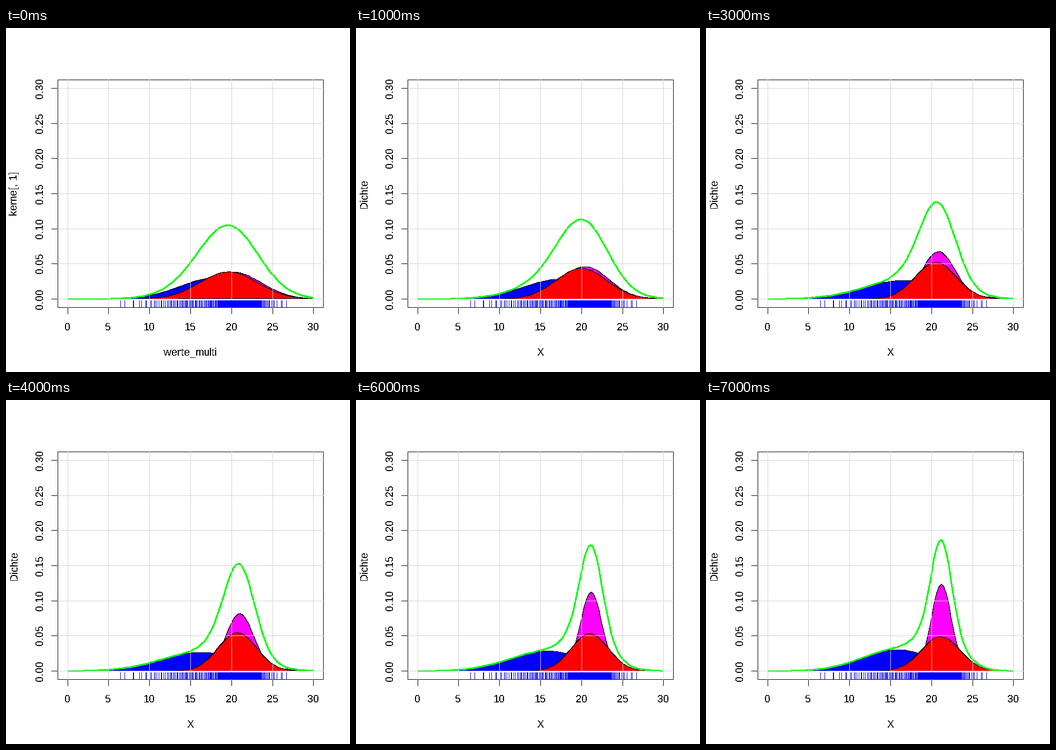
A matplotlib script that plays this animation: 653x653 px, repeating every 8 s.

```python
import numpy as np
import matplotlib.pyplot as plt
from matplotlib.animation import FuncAnimation

SIZE, DPI, FRAMES = 653, 64, 8
PX = 72 / DPI                      # one pixel in points
LEFT, RIGHT, TOP, BOTTOM = 98, 602, 98, 530
GRID, RUG = "#d3d3d3", "#0000ff"

plt.rcParams.update({
    "font.family": "Liberation Sans",
    "text.antialiased": False,
    "text.hinting": "native",
    "text.hinting_factor": 1,
})


def px(x):
    return np.round(350 + (np.asarray(x) - 15) * 504 / 32.4)


def py(d):
    return np.round(514 - np.asarray(d) * 432 / 0.324)


def glide(start, middle, end, k):
    """Quadratic through the values at steps 0, 3 and 7."""
    first, second = (middle - start) / 3, (end - middle) / 4
    return start + first * k + (second - first) / 7 * k * (k - 3)


def normal(xs, weight, mean, dev):
    z = (xs - mean) / dev
    return weight * np.exp(-z * z / 2) / (dev * np.sqrt(2 * np.pi))


def mixture(xs, k):
    """Densities of the blue, magenta and red components at step k."""
    w_blue = glide(0.324, 0.326, 0.329, k)
    w_magenta = glide(0.333, 0.345, 0.381, k)
    return [
        normal(xs, w_blue, glide(18.05, 16.6, 15.75, k),
               glide(4.28, 4.9, 4.33, k)),
        normal(xs, w_magenta, glide(20.15, 20.85, 21.2, k),
               glide(3.45, 2.04, 1.225, k)),
        normal(xs, 1 - w_blue - w_magenta, glide(19.65, 20.5, 21.1, k),
               glide(3.54, 2.52, 2.36, k)),
    ]


fig = plt.figure(figsize=(SIZE / DPI, SIZE / DPI), dpi=DPI, facecolor="white")
ax = fig.add_axes([0, 0, 1, 1])
ax.set_xlim(0, SIZE)
ax.set_ylim(SIZE, 0)
ax.axis("off")


def line(xs, ys, color="black", z=1):
    # The small offset makes snapping pick the pixel that is named.
    ax.plot(np.add(xs, 0.2), np.add(ys, 0.2), color=color, lw=PX, zorder=z,
            snap=True, solid_capstyle="projecting", solid_joinstyle="miter")


def label(x, y, text, turned=False):
    return ax.text(x, y, text, fontsize=20 * PX, ha="center", va="baseline",
                   rotation=90 if turned else 0, rotation_mode="anchor")


def draw_axes():
    line([LEFT, RIGHT, RIGHT, LEFT, LEFT], [TOP, TOP, BOTTOM, BOTTOM, TOP])
    for v in range(0, 31, 5):
        x = px(v)
        line([x, x], [BOTTOM, BOTTOM + 12])
        line([x, x], [TOP, BOTTOM], GRID, 6)
        label(x, 574, str(v))
    for v in np.arange(7) * 0.05:
        y = py(v)
        line([LEFT - 12, LEFT], [y, y])
        line([LEFT, RIGHT], [y, y], GRID, 6)
        label(70, y, f"{v:.2f}", True)


def draw_rug(count=300):
    # Jittered quantiles of the last mixture.
    rng = np.random.default_rng(4)
    xs = np.linspace(5, 28, 1000)
    share = np.cumsum(sum(mixture(xs, FRAMES - 1)))
    ranks = (np.arange(count) + rng.random(count)) / count
    for x in np.unique(px(np.interp(ranks, share / share[-1], xs))):
        line([x, x], [BOTTOM - 13, BOTTOM - 1], RUG, 7)


draw_axes()
draw_rug()
x_label = label(350, 622, "")
y_label = label(21, 314, "", True)

# Unsmoothed strokes fill every pixel they touch, so they are drawn thinner.
curve = dict(antialiased=False, snap=False)
areas = [ax.fill([0, 1, 1], [0, 0, 1], fc=c, ec="black", lw=0.1 * PX,
                 zorder=2, **curve)[0]
         for c in ("#0000ff", "#ff00ff", "#ff0000")]
total, = ax.plot([], [], color="#00ff00", lw=2 * PX, zorder=5,
                 solid_capstyle="butt", solid_joinstyle="round", **curve)
grid_x = np.linspace(0, 30, 100)


def update(k):
    parts = mixture(grid_x, k)
    xs = px(grid_x) + 0.5
    for area, d in zip(areas, parts):
        area.set_xy(np.column_stack([xs, py(d) + 0.5]))
    total.set_data(xs, py(sum(parts)) + 0.5)
    x_label.set_text("X" if k else "werte_multi")
    y_label.set_text("Dichte" if k else "kerne[, 1]")
    return [*areas, total, x_label, y_label]


anim = FuncAnimation(fig, update, frames=FRAMES, interval=1000,
                     repeat=True, repeat_delay=0, blit=False)
plt.show()
```
